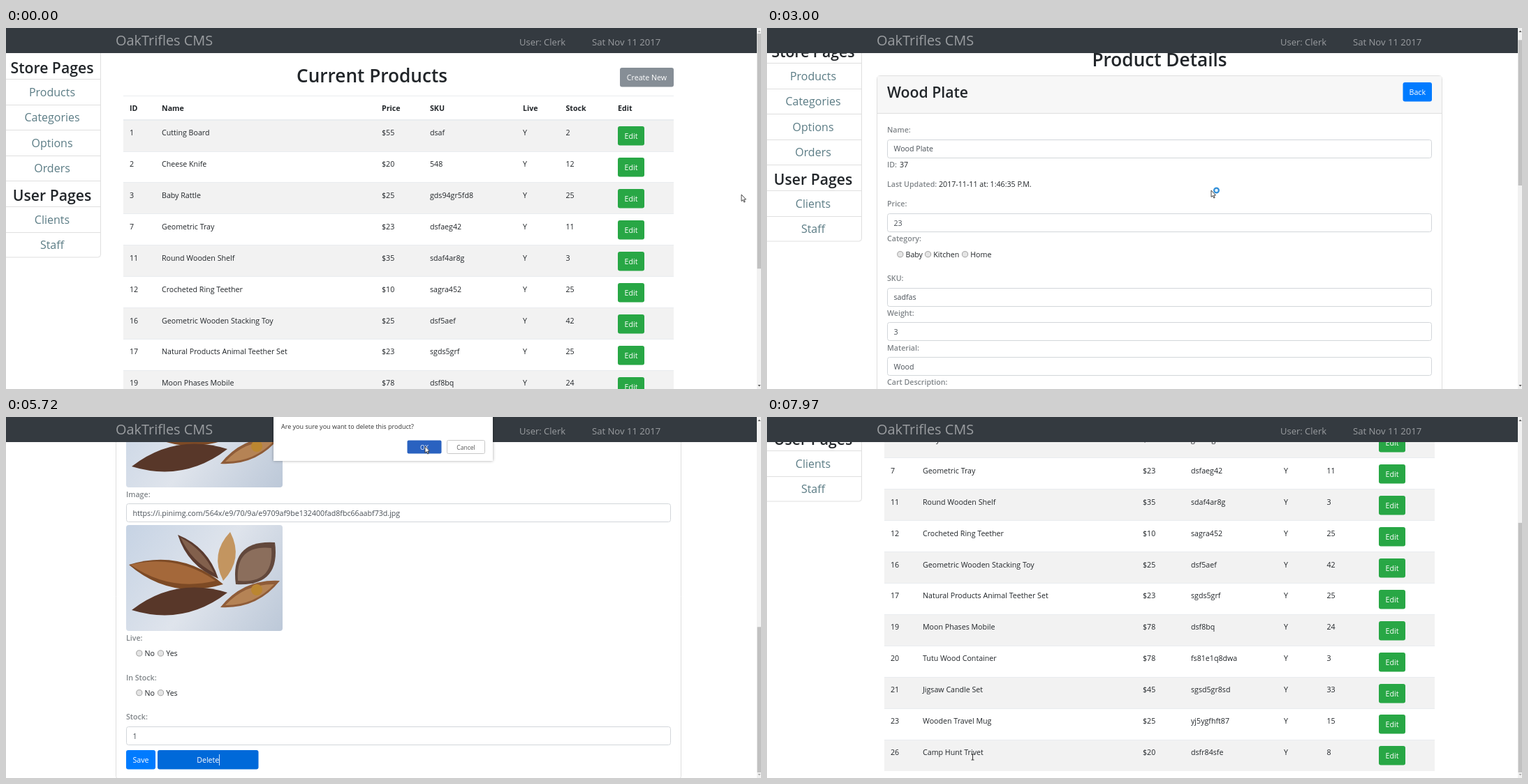
An HTML page with a canvas that plays this animation: 1081x518 px, repeating every 8 s.

```html
<!DOCTYPE html>
<html lang="en">
<head>
<meta charset="utf-8">
<title>Product list</title>
<style>
html, body { margin: 0; width: 100%; height: 100%; overflow: hidden; background: #fff; }
canvas { display: block; }
</style>
</head>
<body>
<canvas id="stage" width="1081" height="518"></canvas>
<script>
const ctx = document.getElementById('stage').getContext('2d');
const W = 1081, H = 518, LOOP = 8000;
const FACE = '"Open Sans", "Noto Sans", sans-serif';
const INK = '#212529', BLUE = '#007bff', BLUE_DARK = '#0069d9', LINE = '#dfdfdf';
const ROW0 = 132, PITCH = 44.92, FORM_H = 1246;

const products = `1|Cutting Board|$55|dsaf|Y|2
2|Cheese Knife|$20|548|Y|12
3|Baby Rattle|$25|gds94gr5fd8|Y|25
7|Geometric Tray|$23|dsfaeg42|Y|11
11|Round Wooden Shelf|$35|sdaf4ar8g|Y|3
12|Crocheted Ring Teether|$10|sagra452|Y|25
16|Geometric Wooden Stacking Toy|$25|dsf5aef|Y|42
17|Natural Products Animal Teether Set|$23|sgds5grf|Y|25
19|Moon Phases Mobile|$78|dsf8bq|Y|24
20|Tutu Wood Container|$78|fs81e1q8dwa|Y|3
21|Jigsaw Candle Set|$45|sgsd5gr8sd|Y|33
23|Wooden Travel Mug|$25|yj5ygfhft87|Y|15
26|Camp Hunt Trivet|$20|dsfr84sfe|Y|8
37|Wood Plate|$23|sadfas|Y|25`.split('\n').map(r => r.split('|'));
const columns = [177, 223, 538, 607, 740, 801.5, 876];
const photoUrl = 'https://i.pinimg.com/564x/e9/70/9a/e9709af9be132400fad8fbc66aabf73d.jpg';

// Bursts of screen updates: start, end, number of updates
const bursts = [
  [200, 980, 11], [1060, 1830, 11], [2090, 2850, 11], [3000, 3800, 10],
  [3870, 4340, 7], [4570, 4800, 4], [4950, 5410, 7], [5640, 5800, 3],
  [5950, 6740, 11], [6830, 6970, 3], [7280, 7970, 10]
];
const OPEN_FORM = 2390, DIALOG = 4640, CLOSE = 5940, BACK_TO_LIST = 6260;

const listScroll = [[150, 0], [420, 110], [750, 253]];
const formScroll = [[2860, 0], [3000, 22.7], [3620, 677], [3800, 728]];
const lastScroll = [[6560, 0], [6970, 208]];
const pointer = [
  [200, 1053, 239], [980, 1016, 249], [1280, 985, 325], [1590, 897, 440],
  [1676, 895, 464], [1830, 894, 484], [2240, 894, 484], [2850, 636, 232],
  [3000, 636, 233], [3620, 636, 236], [3800, 636, 236], [4340, 307, 495],
  [4880, 307, 495], [5410, 600, 42], [5900, 600, 42], [6345, 627, 128],
  [6740, 631, 174], [7220, 631, 174], [7740, 262, 462], [7820, 248, 476],
  [7970, 294.5, 488]
];

function track(keys, t) {
  if (t <= keys[0][0]) return keys[0].slice(1);
  for (let i = 1; i < keys.length; i++) {
    const a = keys[i - 1], b = keys[i];
    if (t <= b[0]) {
      const k = (t - a[0]) / (b[0] - a[0]);
      return a.slice(1).map((v, j) => v + (b[j + 1] - v) * k);
    }
  }
  return keys[keys.length - 1].slice(1);
}

function heldTime(t) {
  let held = 0;
  for (const [a, b, n] of bursts) {
    if (t + 6 < a) break;
    const d = (b - a) / (n - 1);
    held = a + Math.min(n - 1, Math.floor((t + 6 - a) / d)) * d;
  }
  return held;
}

function text(s, x, y, { size = 10.65, weight = 400, color = INK, align = 'left' } = {}) {
  ctx.font = `${weight} ${size}px ${FACE}`;
  ctx.fillStyle = color;
  ctx.textAlign = align;
  ctx.fillText(s, x, y);
}

function rect(x, y, w, h, color) {
  ctx.fillStyle = color;
  ctx.fillRect(x, Math.round(y), w, Math.round(h));
}

function box(x, y, w, h, r, fill, stroke) {
  ctx.beginPath();
  ctx.roundRect(x, y, w, h, r);
  if (fill) { ctx.fillStyle = fill; ctx.fill(); }
  if (stroke) { ctx.strokeStyle = stroke; ctx.lineWidth = 1; ctx.stroke(); }
}

function button(label, x, y, w, color) {
  box(x, Math.round(y), w, 27.5, 3, color);
  text(label, x + w / 2, y + 18, { color: '#fff', align: 'center' });
}

function polygon(points, fill, stroke) {
  ctx.beginPath();
  for (let i = 0; i < points.length; i += 2) ctx.lineTo(points[i], points[i + 1]);
  ctx.closePath();
  ctx.fillStyle = fill;
  ctx.fill();
  if (stroke) { ctx.strokeStyle = stroke; ctx.lineWidth = 0.9; ctx.stroke(); }
}

function sidebar() {
  box(-5.5, 20.5, 141, 308.5, 4, '#fff', LINE);
  const items = ['Store Pages', 'Products', 'Categories', 'Options', 'Orders', 'User Pages', 'Clients', 'Staff'];
  items.forEach((s, i) => {
    const y = 36.4 + i * 36.6;
    if (i) rect(0, y, 135, 1, LINE);
    if (s.endsWith('Pages')) text(s, 66, y + 28.5, { size: 21.2, weight: 600, align: 'center' });
    else text(s, 66, y + 24.6, { size: 16, color: '#5b7c85', align: 'center' });
  });
}

function listPage(rows, hover) {
  text('Current Products', 524, 78, { size: 26.2, weight: 600, align: 'center' });
  button('Create New', 879, 57, 77, '#868e96');
  rect(168, 96.5, 788, 1, '#e9ecef');
  ['ID', 'Name', 'Price', 'SKU', 'Live', 'Stock', 'Edit'].forEach((s, i) =>
    text(s, columns[i], 119, { weight: 700 }));
  rect(168, 131, 788, 1, '#e9ecef');
  rows.forEach((row, i) => {
    const y = ROW0 + i * PITCH;
    if (i % 2 === 0) rect(168, y, 788, PITCH, '#f2f2f2');
    rect(168, y - 0.4, 788, 1, '#e9ecef');
    row.forEach((s, j) => text(s, columns[j], y + 22));
    button('Edit', 876, y + 9.3, 38, i === hover ? '#218838' : '#28a745');
  });
}

function label(s, y) {
  text(s, 172, y, { weight: 600, color: '#7f8488' });
}

function field(name, value, y) {
  label(name, y);
  box(172.5, Math.round(y + 9.5) + 0.5, 779, 26, 3, '#fff', '#d2d6da');
  text(value, 181.5, y + 27.4, { color: '#495057' });
}

function radios(names, xs, y) {
  names.forEach((s, i) => {
    const cx = xs[i];
    ctx.beginPath();
    ctx.arc(cx, y - 4.3, 4.1, 0, 7);
    ctx.fillStyle = '#e4e4e4';
    ctx.fill();
    ctx.strokeStyle = '#a0a0a0';
    ctx.lineWidth = 1;
    ctx.stroke();
    text(s, cx + 7.7, y);
  });
}

function leaf(x1, y1, x2, y2, w, color) {
  const len = Math.hypot(x2 - x1, y2 - y1);
  const nx = (y2 - y1) / len * w, ny = (x1 - x2) / len * w;
  const mx = (x1 + x2) / 2, my = (y1 + y2) / 2;
  ctx.beginPath();
  ctx.moveTo(x1, y1);
  ctx.quadraticCurveTo(mx + nx, my + ny, x2, y2);
  ctx.quadraticCurveTo(mx - nx, my - ny, x1, y1);
  ctx.fillStyle = color;
  ctx.fill();
}

function photo(y) {
  ctx.save();
  ctx.translate(172, y);
  ctx.beginPath();
  ctx.roundRect(0, 0, 224, 152, 4);
  ctx.clip();
  const g = ctx.createLinearGradient(0, 0, 224, 152);
  g.addColorStop(0, '#c6d3e4');
  g.addColorStop(0.5, '#dfe4ec');
  g.addColorStop(1, '#bcc8d8');
  ctx.fillStyle = g;
  ctx.fillRect(0, 0, 224, 152);
  leaf(4, 57, 139, 85, 38, '#7d4a25');
  leaf(6, 57, 128, 80, 28, '#a4683a');
  leaf(8, 122, 145, 97, 36, '#583729');
  leaf(74, 14, 132, 77, 20, '#5b3b2f');
  leaf(78, 18, 126, 69, 12, '#82604c');
  leaf(149, 10, 139, 80, 25, '#c39560');
  leaf(213, 25, 157, 85, 50, '#62483c');
  leaf(208, 33, 160, 80, 40, '#8b6e5c');
  leaf(220, 80, 135, 118, 24, '#8f5c38');
  leaf(212, 85, 142, 115, 17, '#b58355');
  ctx.beginPath();
  ctx.arc(187, 93, 8, 0, 7);
  ctx.fillStyle = '#bb8630';
  ctx.fill();
  ctx.restore();
}

function formPage(deleteHover, caret) {
  text('Product Details', 562, 78, { size: 26.2, weight: 600, align: 'center' });
  box(157.5, 91.5, 809, 1156, 4, '#fff', LINE);
  rect(158, 92, 808, 53, '#f7f7f7');
  rect(158, 145, 808, 1, LINE);
  text('Wood Plate', 172, 122.5, { size: 21.2, weight: 600 });
  button('Back', 910.5, 100.5, 41.5, BLUE);
  field('Name:', 'Wood Plate', 173);
  label('ID:', 222.5);
  text('37', 190, 222.5);
  label('Last Updated:', 251);
  text('2017-11-11 at: 1:46:35 P.M.', 246, 251);
  field('Price:', '23', 279.3);
  label('Category:', 329.3);
  radios(['Baby', 'Kitchen', 'Home'], [190.8, 230.5, 283.5], 352);
  field('SKU:', 'sadfas', 386);
  field('Weight:', '3', 435.7);
  field('Material:', 'Wood', 485.5);
  field('Cart Description:', 'Wood Plate', 535.2);
  field('Description:', 'Wood Plate', 585);
  field('Thumbnail:', photoUrl, 634.8);
  photo(677);
  field('Image:', photoUrl, 842.7);
  photo(883);
  label('Live:', 1048.5);
  radios(['No', 'Yes'], [190.8, 221.5], 1071.3);
  label('In Stock:', 1105.5);
  radios(['No', 'Yes'], [190.8, 221.5], 1128);
  field('Stock:', '1', 1162.4);
  button('Save', 172, 1206, 42, BLUE);
  button('Delete', 217, 1206, 144.5, deleteHover ? BLUE_DARK : BLUE);
  if (caret) rect(305, 1212, 1, 16, '#cfe2f8');
}

function header() {
  rect(0, 0, 1075, 36, '#343a40');
  const color = '#9a9da0';
  text('OakTrifles CMS', 157, 25, { size: 19.9, color });
  text('User: Clerk', 735, 25, { size: 13, color });
  text('Sat Nov 11 2017', 839, 25, { size: 13.1, color });
}

function scrollbar(scroll, pageH) {
  const k = 502 / pageH;
  rect(1075, 0, 6, H, '#f1f1f1');
  ctx.fillStyle = '#c1c1c1';
  ctx.fillRect(1075.6, 8 + scroll * k, 5.4, H * k);
  polygon([1076.5, 6, 1078.5, 3.5, 1080.5, 6], scroll > 1 ? '#555' : '#a8a8a8');
  polygon([1076.5, 512, 1078.5, 514.5, 1080.5, 512], scroll < pageH - H - 1 ? '#555' : '#a8a8a8');
}

function statusBubble(alpha) {
  ctx.globalAlpha = alpha;
  rect(0, 503, 360, 15, '#f2f2f2');
  text('Waiting for localhost...', 0, 514, { size: 8, color: '#888' });
  ctx.globalAlpha = 1;
}

function dialog(hover, pressed) {
  ctx.save();
  ctx.shadowColor = 'rgba(0,0,0,.35)';
  ctx.shadowBlur = 4;
  rect(383, -6, 314, 69, '#fff');
  ctx.restore();
  text('Are you sure you want to delete this product?', 394, 17, { size: 9, color: '#333' });
  box(574.5, 33.5, 49, 19, 2, pressed ? '#2a62c0' : hover ? '#5a94f5' : '#4285f4');
  text('OK', 599, 46.5, { size: 8.6, color: '#fff', align: 'center' });
  box(631.5, 33.5, 54, 19, 2, '#fff', '#c8c8c8');
  text('Cancel', 658.5, 46.5, { size: 8.6, color: '#555', align: 'center' });
}

function cursor(kind, x, y, busy) {
  ctx.save();
  ctx.translate(x, y);
  if (kind === 'beam') {
    ctx.strokeStyle = y > 490 ? '#b9cfe8' : '#333';
    ctx.lineWidth = 1;
    ctx.beginPath();
    for (const d of [-4, 4]) { ctx.moveTo(-2, d); ctx.lineTo(2, d); }
    ctx.moveTo(0, -4);
    ctx.lineTo(0, 4);
    ctx.stroke();
  } else if (kind === 'hand') {
    polygon([-1, 0, 1, 0, 1, 4, 6, 5, 6, 9, 4.5, 12, -1, 12, -4, 7, -3, 6, -1, 8], '#fff', '#222');
  } else {
    polygon([0, 0, 0, 9.5, 2.2, 7.6, 3.8, 11, 5.2, 10.4, 3.7, 7, 6.5, 7], '#fff', '#333');
  }
  if (busy) {
    ctx.beginPath();
    ctx.arc(7.5, 0, 3.4, 0, 7);
    ctx.fillStyle = '#e8f3fc';
    ctx.fill();
    ctx.strokeStyle = '#318fd8';
    ctx.lineWidth = 2.2;
    ctx.stroke();
  }
  ctx.restore();
}

function editRowAt(x, y, scroll, count) {
  if (x < 876 || x > 914) return -1;
  const p = y + scroll - ROW0, i = Math.floor(p / PITCH), d = p - i * PITCH;
  return i >= 0 && i < count && d > 9 && d < 37 ? i : -1;
}

function draw(now) {
  const t = heldTime(now);
  const onForm = t >= OPEN_FORM && t < BACK_TO_LIST;
  const rows = t < OPEN_FORM ? products : products.slice(0, -1);
  const pageH = onForm ? FORM_H : ROW0 + rows.length * PITCH + 10;
  const keys = onForm ? formScroll : t < OPEN_FORM ? listScroll : lastScroll;
  const scroll = Math.round(Math.min(track(keys, t)[0], pageH - H));
  const [x, y] = track(pointer, t);

  ctx.fillStyle = '#fff';
  ctx.fillRect(0, 0, W, H);
  ctx.save();
  ctx.translate(0, -scroll);
  sidebar();
  if (onForm) formPage(t > 4260, t >= 4560);
  else {
    const [px, py] = track(pointer, t - 80); // hover lags behind the pointer
    listPage(rows, editRowAt(px, py, scroll, rows.length));
  }
  ctx.restore();
  header();
  scrollbar(scroll, pageH);

  if (t > 2150 && t < OPEN_FORM) statusBubble(1);
  if (t > 6020 && t < 6400) statusBubble(t < BACK_TO_LIST ? 1 : t < 6300 ? 0.6 : 0.25);
  if (t >= DIALOG && t < CLOSE) dialog(t > 5380, t > 5630 && t < 5790);

  let kind = 'arrow';
  if (!onForm && editRowAt(x, y, scroll, rows.length) >= 0) kind = 'hand';
  if ((t > 4330 && t < 4940) || t > 7700) kind = 'beam';
  cursor(kind, x, y, t > 2150 && t < 4200 && kind === 'arrow');
}

const start = performance.now();
function tick() {
  draw((performance.now() - start) % LOOP);
  requestAnimationFrame(tick);
}
tick();
</script>
</body>
</html>
```
